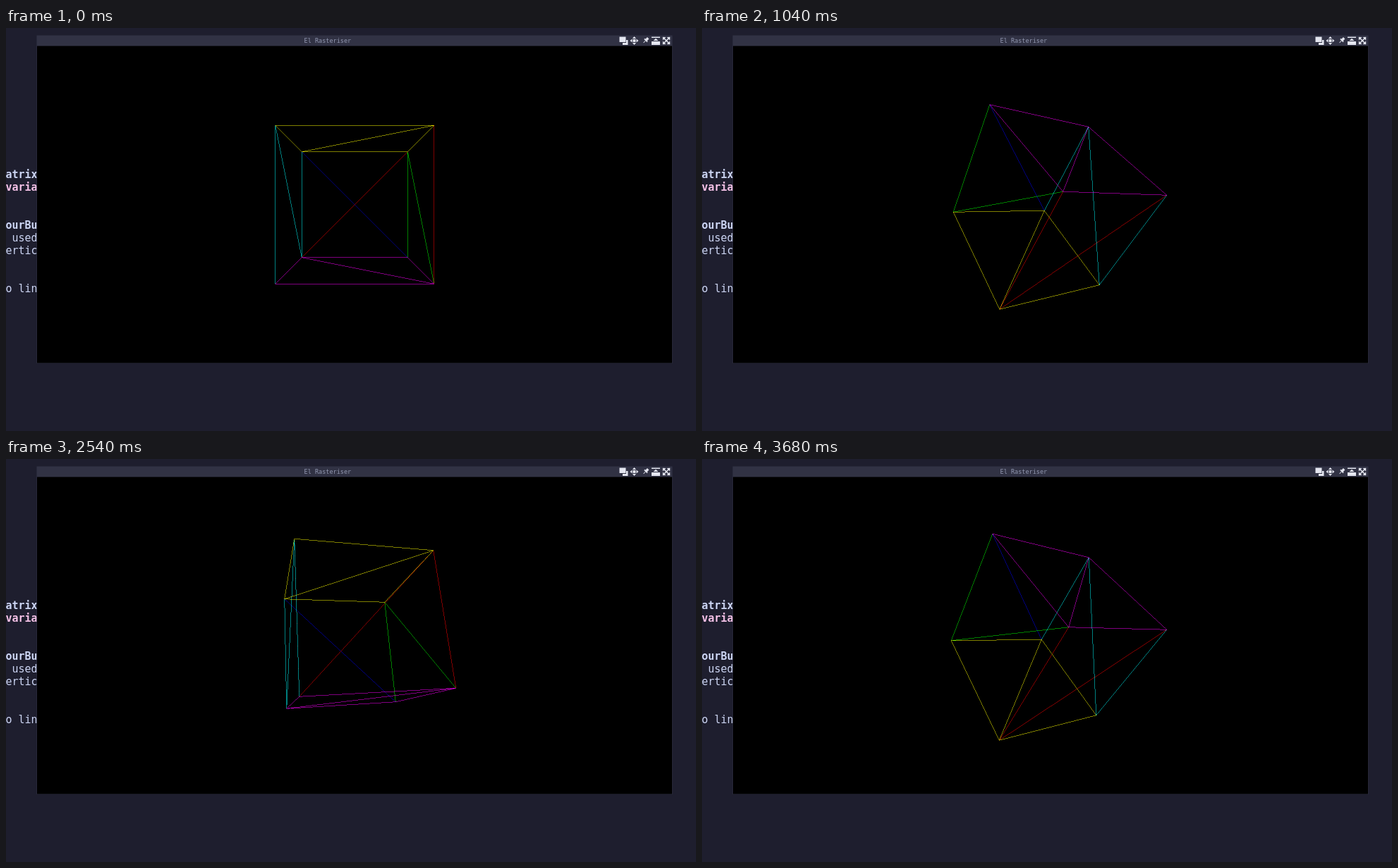
Write an HTML page with a canvas that moves like this. It is 978 by 572 pixels and loops after 3720 ms.

```html
<!DOCTYPE html>
<html lang="en">
<head>
<meta charset="utf-8">
<title>El Rasteriser</title>
<style>
html, body { margin: 0; width: 100%; height: 100%; overflow: hidden; background: #1e1e2e; }
canvas { display: block; }
</style>
</head>
<body>
<canvas id="stage" width="978" height="572"></canvas>
<script>
const ctx = document.getElementById('stage').getContext('2d');
const LOOP = 3720, TICK = 20, LAST_TICK = 184;
const MONO = '"DejaVu Sans Mono", monospace';
const TEXT = '#cdd6f4', PINK = '#f5c2e7', ICON = '#e4e6f0', FRAME = '#313244';

// The cube is rasterised at double size and shown at half size.
const VIEW = { x: 44, y: 25, w: 900, h: 451 };
const FOCAL = 900, DISTANCE = 5, CENTER_X = 900, CENTER_Y = 451;
const raster = document.createElement('canvas');
raster.width = VIEW.w * 2;
raster.height = VIEW.h * 2;
const pen = raster.getContext('2d');

// Corner index bits: 1 = +x, 2 = +y, 4 = +z. Each face is split along its first and third corner.
const FACES = [
  ['#0000ff', 6, 7, 5, 4],
  ['#00ff00', 7, 3, 1, 5],
  ['#ff0000', 3, 2, 0, 1],
  ['#00ffff', 2, 6, 4, 0],
  ['#ffff00', 3, 2, 6, 7],
  ['#ff00ff', 4, 0, 1, 5],
];

function rect(color, x, y, w, h) {
  ctx.fillStyle = color;
  ctx.fillRect(x, y, w, h);
}

function polygon(color, ...points) {
  ctx.fillStyle = color;
  ctx.beginPath();
  points.forEach(([x, y]) => ctx.lineTo(x, y));
  ctx.fill();
}

function label(text, x, y, font, color) {
  ctx.font = `${font} ${MONO}`;
  ctx.fillStyle = color;
  ctx.fillText(text, x, y);
}

function turned(x, y, angle, draw) {
  ctx.save();
  ctx.translate(x, y);
  ctx.rotate(angle);
  draw();
  ctx.restore();
}

// Repeats a shape in four quarter turns around a point.
function fourWays(x, y, angle, draw) {
  for (let i = 0; i < 4; i++) turned(x, y, angle + i * Math.PI / 2, draw);
}

function drawIcons() {
  rect(ICON, 874, 17, 7.5, 7);
  rect(FRAME, 869, 12, 10, 9);
  rect(ICON, 869.5, 12.5, 9, 7.5);

  rect(ICON, 888.5, 16, 4, 4);
  fourWays(890.5, 18, 0, () => polygon(ICON, [-2.6, -3], [0, -6], [2.6, -3]));

  turned(907, 17.5, Math.PI / 4, () => {
    rect(ICON, -1.7, -4.5, 3.4, 4.5);
    rect(ICON, -3, -0.8, 6, 1.6);
    rect(ICON, -0.4, 0.8, 0.8, 4);
  });

  rect(ICON, 915, 12.5, 12, 1.5);
  polygon(ICON, [917.5, 18], [921, 14.8], [924.5, 18]);
  rect(ICON, 915, 19, 12, 5);

  fourWays(936, 18, Math.PI / 4, () => {
    rect(ICON, -0.8, -5, 1.6, 5);
    polygon(ICON, [-3.2, -4], [0, -7.4], [3.2, -4]);
  });
}

function drawDesktop() {
  rect('#1e1e2e', 0, 0, 978, 572);
  const left = -0.6;
  label('atrix', left, 212.5, 'bold 15px', TEXT);
  label('varia', left, 230.5, 'bold 15px', PINK);
  label('ourBu', left, 284.5, 'bold 15px', TEXT);
  label(' used', left, 302.5, '15px', TEXT);
  label('ertic', left, 320.5, '15px', TEXT);
  label('o lin', left, 374.5, '15px', TEXT);
  rect(FRAME, 43.5, 10.5, 901, 465.5);
  label('El Rasteriser', 422.6, 21.3, '8.5px', '#9399b2');
  drawIcons();
}

function line([x, y], [endX, endY]) {
  const dx = Math.abs(endX - x), dy = -Math.abs(endY - y);
  const stepX = Math.sign(endX - x), stepY = Math.sign(endY - y);
  let error = dx + dy;
  for (;;) {
    pen.fillRect(x, y, 1, 1);
    if (x === endX && y === endY) return;
    const twice = 2 * error;
    if (twice >= dy) { error += dy; x += stepX; }
    if (twice <= dx) { error += dx; y += stepY; }
  }
}

// Turns a corner about x, then about y, and projects it.
function project(corner, angle) {
  const sign = bit => corner & bit ? 1 : -1;
  const c = Math.cos(angle), s = Math.sin(angle);
  const x = sign(1);
  const y = sign(2) * c + sign(4) * s;
  const z = sign(4) * c - sign(2) * s;
  const scale = FOCAL / (DISTANCE + z * c - x * s);
  return [
    Math.floor(CENTER_X + (x * c + z * s) * scale),
    Math.floor(CENTER_Y - y * scale),
  ];
}

// The cube turns 0.05 rad per tick and pauses for one tick in every 18.
function angleAt(time) {
  const tick = Math.min(LAST_TICK, Math.floor(time / TICK));
  return 0.05 * (tick - Math.floor((tick + 13) / 18));
}

function drawCube(angle) {
  pen.fillStyle = FRAME;
  pen.fillRect(0, 0, raster.width, raster.height);
  pen.fillStyle = '#000';
  pen.fillRect(0, 1, raster.width, raster.height - 2);
  const corners = Array.from({ length: 8 }, (_, i) => project(i, angle));
  for (const [color, ...face] of FACES) {
    const [a, b, c, d] = face.map(i => corners[i]);
    pen.fillStyle = color;
    for (const [from, to] of [[a, b], [b, c], [c, a], [c, d], [d, a]]) line(from, to);
  }
  ctx.drawImage(raster, VIEW.x, VIEW.y, VIEW.w, VIEW.h);
}

let start, shown;
function frame(now) {
  start ??= now;
  const angle = angleAt((now - start) % LOOP);
  if (angle !== shown) drawCube(shown = angle);
  requestAnimationFrame(frame);
}

drawDesktop();
drawCube(0);
requestAnimationFrame(frame);
</script>
</body>
</html>
```
